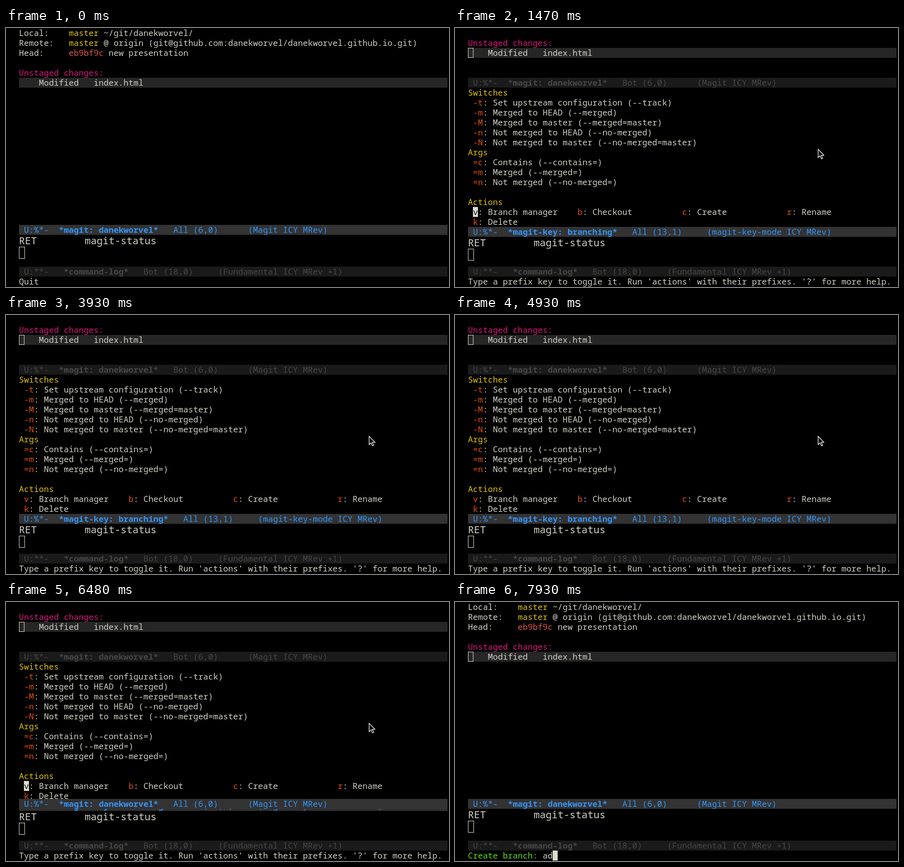
Animation of 889x521 px, one loop 8000 ms. Source, as an HTML page:

```html
<!DOCTYPE html>
<html lang="en">
<head>
<meta charset="utf-8">
<title>Creating a branch in Magit</title>
<style>
html, body { margin: 0; width: 100%; height: 100%; overflow: hidden; background: #000; }
#stage {
  position: relative; width: 889px; height: 521px; overflow: hidden;
  font: 200 16.6667px/20px "Noto Sans Mono", "Liberation Mono", monospace;
  color: #cfcfc4; white-space: pre;
}
.scene, .mouse { position: absolute; left: 0; top: 0; }
.line { position: absolute; left: 26px; top: var(--y); width: 860px; }
.hl { background: #262626; height: 20px; }
.bar { background: #1a1a1a; color: #464646; height: 20px; }
.active { background: #333; color: #3593f5; }
.bar b { font-weight: 600; }
i { font-style: normal; }
.pink { color: #d8187a; }
.gold { color: #dcc012; }
.key { color: #e0500f; }
.hash { color: #d9564c; }
.green { color: #5fd81c; }
.block, .box { position: absolute; left: var(--x, 26px); top: var(--y); width: 10px; height: 20px; }
.block { background: #dcdccc; color: #111; }
.box { box-sizing: border-box; width: 11px; border: 1px solid #dcdccc; }
.log { position: absolute; left: 26px; top: 416px; font-size: 20px; line-height: 24px; animation: log 8s step-end infinite; }
.log .box { left: 0; top: 24px; width: 12px; height: 24px; }

/* Visibility over the 8 s loop */
.status { animation: status 8s step-end infinite; }
.keys { animation: keys 8s step-end infinite; }
.redraw { animation: redraw 8s step-end infinite; }
.mouse { animation: mouse 8s step-end infinite; }
.point { animation: point 8s step-end infinite; }
.quit { animation: quit 8s step-end infinite; }
.help { animation: help 8s step-end infinite; }
.prompt, .idle { animation: prompt 8s step-end infinite; }
.empty { animation: empty 8s step-end infinite; }
.one { animation: one 8s step-end infinite; }
.two { animation: two 8s step-end infinite; }
.blink-key { animation: blink-key 1s step-end infinite; }
.blink-mini { animation: blink-mini 1s step-end infinite; }

@keyframes status { 0%, 81.5%, 100% { opacity: 1 } 18.375% { opacity: 0 } }
@keyframes keys   { 0%, 81.5%, 100% { opacity: 0 } 18.375% { opacity: 1 } }
@keyframes redraw { 0%, 81.5%, 100% { opacity: 0 } 81% { opacity: 1 } }
@keyframes mouse  { 0%, 97.75%, 100% { opacity: 0 } 18.375% { opacity: 1 } }
@keyframes point  { 0%, 18.375%, 100% { opacity: 0 } 2% { opacity: 1 } }
@keyframes quit   { 0% { opacity: 1 } 17.875%, 100% { opacity: 0 } }
@keyframes help   { 0%, 81.5%, 100% { opacity: 0 } 17.875% { opacity: 1 } }
@keyframes prompt { 0% { opacity: 0 } 81.5%, 100% { opacity: 1 } }
@keyframes empty  { 0%, 97.75%, 100% { opacity: 0 } 81.5% { opacity: 1 } }
@keyframes one    { 0%, 99.125%, 100% { opacity: 0 } 97.75% { opacity: 1 } }
@keyframes two    { 0% { opacity: 0 } 99.125%, 100% { opacity: 1 } }
@keyframes log    { 0%, 81.5%, 100% { top: 416px } 18.375% { top: 420px } }
@keyframes blink-key  { 0%, 93%, 100% { opacity: 0 } 43% { opacity: 1 } }
@keyframes blink-mini { 0%, 97%, 100% { opacity: 0 } 47% { opacity: 1 } }
</style>
</head>
<body>
<div id="stage"><div class="scene status"><div class="line" style="--y:0px">Local:    <i class="gold">master</i> ~/git/danekworvel/
Remote:   <i class="gold">master</i> @ origin (git@github.com:danekworvel/danekworvel.github.io.git)
Head:     <i class="hash">eb9bf9c</i> new presentation

<i class="pink">Unstaged changes:</i></div><div class="line hl" style="--y:100px">    Modified   index.html</div><div class="block point" style="--y:100px"></div><div class="box idle" style="--y:100px"></div><div class="line bar active" style="--y:396px"> U:%*-  <b>*magit: danekworvel*</b>   All (6,0)      (Magit ICY MRev)</div></div><div class="scene keys"><div class="line pink" style="--y:20px">Unstaged changes:</div><div class="line hl" style="--y:40px">    Modified   index.html</div><div class="box" style="--y:40px"></div><div class="line bar" style="--y:100px"> U:%*-  <b>*magit: danekworvel*</b>   Bot (6,0)      (Magit ICY MRev)</div><div class="line" style="--y:120px"><i class="gold">Switches</i>
 <i class="key">-t</i>: Set upstream configuration (--track)
 <i class="key">-m</i>: Merged to HEAD (--merged)
 <i class="key">-M</i>: Merged to master (--merged=master)
 <i class="key">-n</i>: Not merged to HEAD (--no-merged)
 <i class="key">-N</i>: Not merged to master (--no-merged=master)
<i class="gold">Args</i>
 <i class="key">=c</i>: Contains (--contains=)
 <i class="key">=m</i>: Merged (--merged=)
 <i class="key">=n</i>: Not merged (--no-merged=)

<i class="gold">Actions</i>
 <i class="key">v</i>: Branch manager    <i class="key">b</i>: Checkout          <i class="key">c</i>: Create            <i class="key">r</i>: Rename
 <i class="key">k</i>: Delete</div><div class="block blink-key" style="--x:36px;--y:360px">v</div><div class="line bar active" style="--y:400px"> U:%*-  <b>*magit-key: branching*</b>   All (13,1)     (magit-key-mode ICY MRev)</div></div><div class="line bar active redraw" style="--y:396px"> U:%*-  <b>*magit: danekworvel*</b>   All (6,0)      (Magit ICY MRev)</div><div class="log">RET        magit-status<div class="box"></div></div><div class="line bar" style="--y:480px"> U:**-   <b>*command-log*</b>   Bot (18,0)     (Fundamental ICY MRev +1)</div><div class="line quit" style="--y:500px">Quit</div><div class="line help" style="--y:500px">Type a prefix key to toggle it. Run 'actions' with their prefixes. '?' for more help.</div><div class="line prompt green" style="--y:500px">Create branch:</div><div class="scene empty"><div class="block blink-mini" style="--x:176px;--y:500px"></div></div><div class="scene one"><div class="line" style="--y:500px">               a</div><div class="block" style="--x:186px;--y:500px"></div></div><div class="scene two"><div class="line" style="--y:500px">               ad</div><div class="block" style="--x:196px;--y:500px"></div></div><svg class="mouse" width="889" height="521"><path d="M728.7 244v16.6l3.8-3.6 2.9 6.2 2.5-1.1-2.8-6h5.2z" fill="#000" stroke="#fff" stroke-width="1.2"/></svg></div>
</body>
</html>
```
